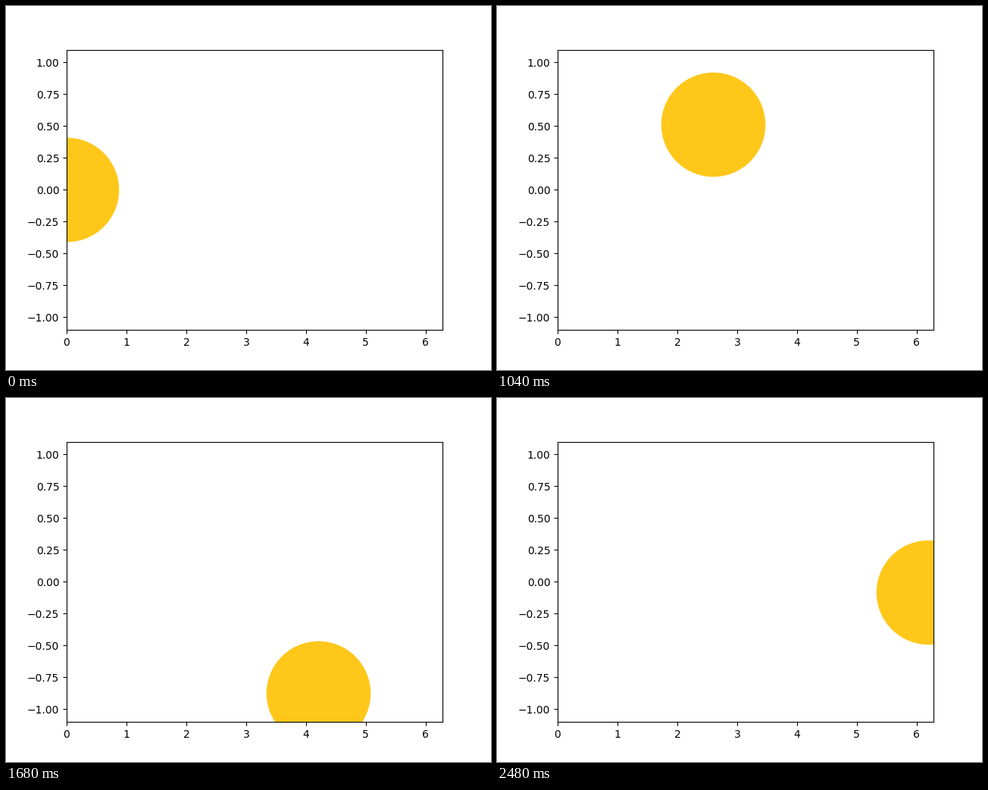
Write a matplotlib script that moves like this. It is 640 px wide and 480 px high and loops after 2520 ms.

```python
import numpy as np
import matplotlib.pyplot as plt
from matplotlib.animation import FuncAnimation

FRAMES = 63
INTERVAL = 40
STEP = 0.1

fig, ax = plt.subplots(figsize=(6.4, 4.8), dpi=100)
ax.set_xlim(0, 2 * np.pi)
ax.set_ylim(-1.1, 1.1)
ball, = ax.plot([], [], "o", color="#ffc71a", markersize=98)


def update(i):
    """Move the ball along one period of the sine curve."""
    x = i * STEP
    ball.set_data([x], [np.sin(x)])
    return ball,


anim = FuncAnimation(fig, update, frames=FRAMES, interval=INTERVAL,
                     repeat=True, repeat_delay=0)

plt.show()
```
